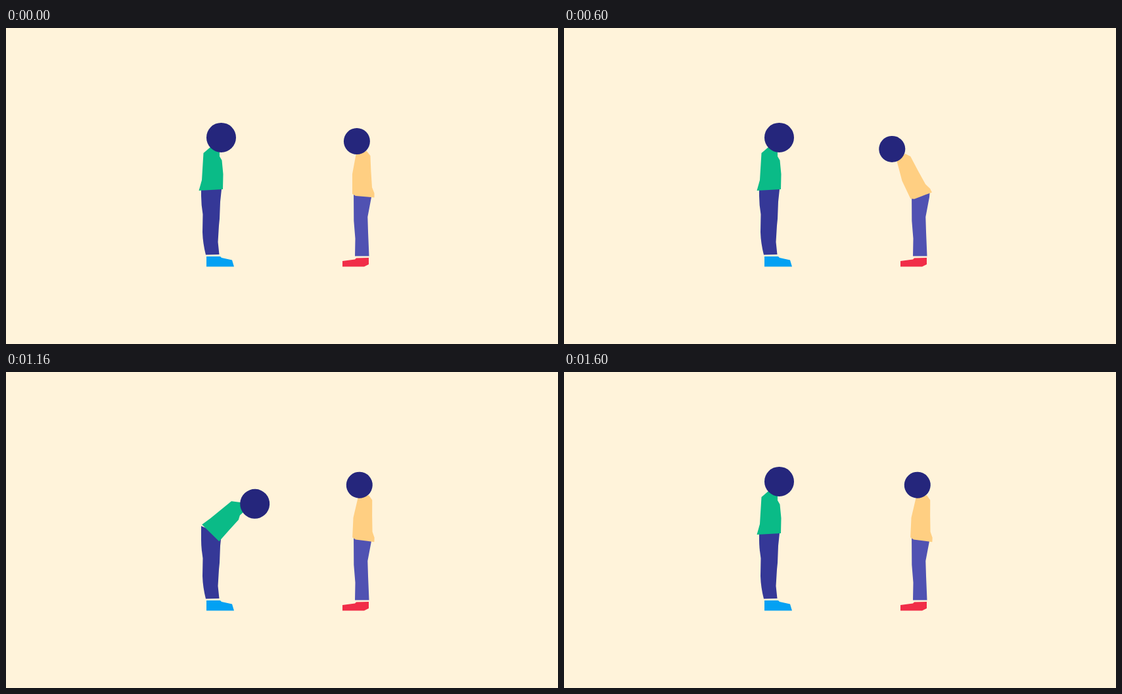
An HTML page that plays this animation: 840 px wide and 480 px high, repeating every 1.62 s.

```html
<!DOCTYPE html>
<html lang="en">
<head>
<meta charset="utf-8">
<title>Two people bowing</title>
<style>
  html, body { margin: 0; height: 100%; overflow: hidden; background: #fff3da; }
  svg { display: block; width: 840px; height: 480px; }
</style>
</head>
<body>
<svg viewBox="0 0 840 480">
  <g id="left">
    <path fill="#03a1f3" d="M305 347H326L328 349 344 352.5 347 362.5H305Z"/>
    <path fill="#353897" d="M297 234L312 240 328 245 326 264 325 290 324 300 322.5 325 324.5 344 304 344.5 Q299.5 327 299 310L299.5 283Q297 268 297 255Z"/>
    <g class="torso">
      <path class="shirt" fill="#0abb87"/>
      <circle cx="327.5" cy="166.4" r="22.5" fill="#25267c"/>
    </g>
  </g>
  <g id="right">
    <path fill="#f12d48" d="M512 354L531 351.5 533 349.5 552 349V359L545 362.5H512Z"/>
    <path fill="#5052b2" d="M529 246L557 245 556 257 550.3 287 551 310 552.5 346.5H531L531.5 320 529.3 293Z"/>
    <g class="torso">
      <path fill="#ffcf82" d="M533 190L549 187 554.5 194 555.5 218 557 242 560.5 251V257.5L550 256.5 532 255 527 252V222Z"/>
      <circle cx="534" cy="172" r="20" fill="#25267c"/>
    </g>
  </g>
</svg>
<script>
  const LOOP = 1620, STEP = 20;
  const leftTorso = document.querySelector('#left .torso');
  const rightTorso = document.querySelector('#right .torso');
  const leftShirt = document.querySelector('.shirt');

  // Linear rise to 1 at the peak, then a linear fall back to 0.
  const bow = (t, start, peak, end) =>
    Math.max(0, Math.min((t - start) / (peak - start), (end - t) / (end - peak)));

  function draw(now) {
    const t = Math.floor(now % LOOP / STEP) * STEP;

    const leftBow = bow(t, 780, 1180, 1580);
    leftTorso.setAttribute('transform', `rotate(${50 * leftBow} 314.6 241.5)`);
    // The hem slides a little over the hips.
    const hem = 3 * leftBow;
    leftShirt.setAttribute('d', `M300.5 190L311 181 325 184V195L328.5 201 330.5 222
      ${330 + hem} 245 ${293.5 + hem} 247 298 231Z`);

    const rightBow = t === LOOP - STEP ? 0 : bow(t, -20, 400, 800);
    rightTorso.setAttribute('transform', `rotate(${2.6 - 56 * rightBow} 543 255)`);

    requestAnimationFrame(() => draw(performance.now()));
  }
  draw(0);
</script>
</body>
</html>
```
